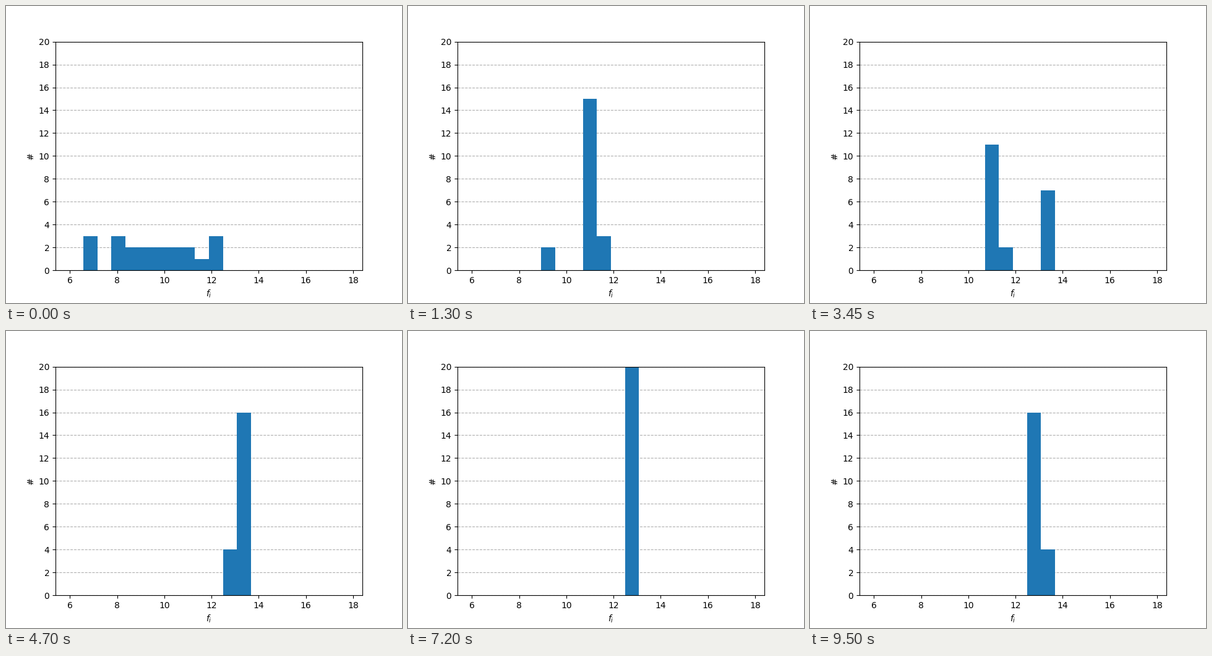
Write a matplotlib script that moves like this. It is 640 px wide and 480 px high and loops after 9550 ms.

```python
import math
import random

import matplotlib.pyplot as plt
import numpy as np
from matplotlib.animation import FuncAnimation

plt.rcParams["font.family"] = "DejaVu Sans"

FRAMES, INTERVAL = 191, 50
BINS = 20
X_MIN, X_MAX = 5.3904, 18.395
CONVERGED = {11: 20}

# Frame: individuals per bin
KEYS = {
    0: {1: 3, 3: 3, **dict.fromkeys(range(4, 9), 2), 9: 1, 10: 3},
    26: {5: 2, 8: 15, 9: 3},
    61: {8: 17, 9: 3},
    69: {8: 11, 9: 2, 12: 7},
    80: {11: 5, 12: 15},
    94: {11: 4, 12: 16},
    114: {11: 7, 12: 13},
    131: CONVERGED,
    151: CONVERGED,
    165: {11: 11, 12: 9},
    179: CONVERGED,
    187: CONVERGED,
    190: {11: 16, 12: 4},
}


def members(counts):
    return [b for b in sorted(counts) for _ in range(counts[b])]


def tally(pop):
    return np.bincount(pop, minlength=BINS)


def breed(rng, old, new, order, progress):
    """Replace part of the old population, then copy and mutate a little."""
    pop = list(old)
    for i in order[:round(progress * len(old))]:
        pop[i] = new[i]
    for _ in range(2):
        pop[rng.randrange(len(pop))] = rng.choice(pop)
    if rng.random() < 0.3:
        pop[rng.randrange(len(pop))] = rng.randint(min(old + new),
                                                   max(old + new))
    return tally(pop)


def evolve():
    rng = random.Random(7)
    frames = list(KEYS)
    history = [tally(members(KEYS[0]))]
    for first, last in zip(frames, frames[1:]):
        old, new = members(KEYS[first]), members(KEYS[last])
        order = rng.sample(range(len(old)), len(old))
        for frame in range(first + 1, last):
            prev = counts = history[-1]
            progress = math.sin(math.pi / 2 * (frame - first) / (last - first))
            # A converged population rests; others now and then skip a beat.
            if old != new and rng.random() < 0.9:
                while np.array_equal(counts, prev):
                    counts = breed(rng, old, new, order, progress)
            history.append(counts)
        history.append(tally(new))
    return history


history = evolve()

fig, ax = plt.subplots(figsize=(6.4, 4.8), dpi=100)
# The bins fill the axis except for one bin width on either side.
edges = np.linspace(X_MIN, X_MAX, BINS + 3)[1:-1]
bars = ax.bar(edges[:-1], history[0], width=np.diff(edges), align="edge",
              color="#1f77b4")
ax.set_xlim(X_MIN, X_MAX)
ax.set_ylim(0, 20)
ax.set_xticks(range(6, 19, 2))
ax.set_yticks(range(0, 21, 2))
ax.set_axisbelow(True)
ax.grid(axis="y", linestyle="--")
ax.set_xlabel("$f_i$")
ax.set_ylabel("#")


def update(frame):
    for bar, count in zip(bars, history[frame]):
        bar.set_height(count)
    return bars.patches


anim = FuncAnimation(fig, update, frames=FRAMES, interval=INTERVAL,
                     repeat=True, repeat_delay=0)
plt.show()
```
